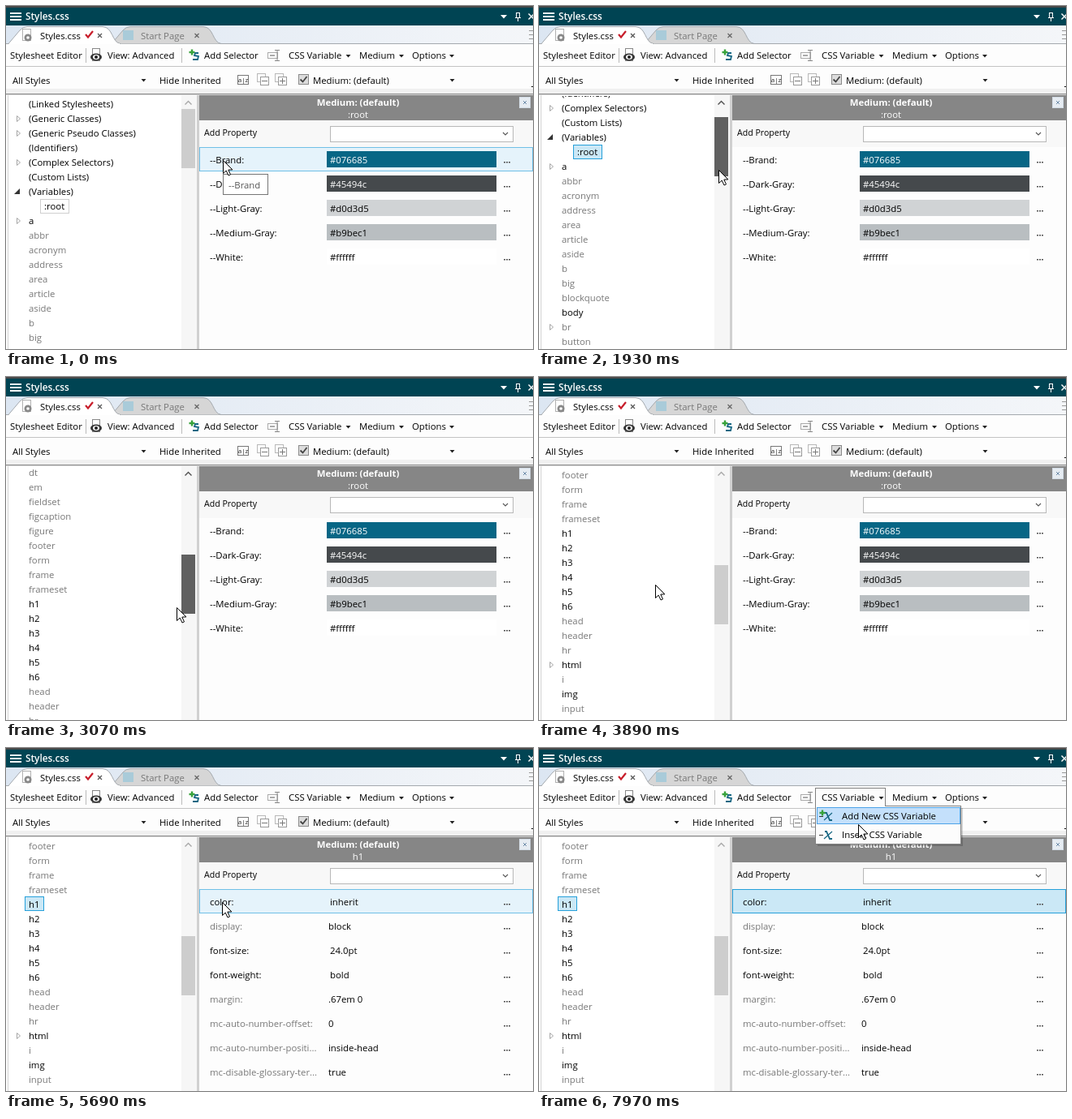
Recreate the animation shown at these times as an HTML page with a canvas. Size 649 by 423 pixels, loop 8000 ms.

```html
<!DOCTYPE html>
<html lang="en">
<head>
<meta charset="utf-8">
<title>Stylesheet editor</title>
<style>
html, body { margin: 0; width: 100%; height: 100%; overflow: hidden; background: #fff; }
canvas { display: block; width: 649px; height: 423px; }
</style>
</head>
<body>
<canvas id="stage" width="649" height="423"></canvas>
<script>
const ctx = document.getElementById('stage').getContext('2d');
const LOOP = 8000;
const ROW = 18, PROP = 30;
const GRAY = '#787878', GREEN = '#37a23b', TEAL = '#176783';

// Moments of interaction
const PRESS = 1620, RELEASE = 3610, PICK = 4580, FOCUS = 5970, OPEN = 7260;

// Pointer moves: each runs from a to b in n jumps and ends at x, y
const home = { x: 267, y: 190 };
const drag = { a: 1930, b: 3340, n: 12, x: 208, y: 297 };
const moves = [
  { a: 500, b: 1060, n: 5, x: 222, y: 192 },
  drag,
  { a: 3610, b: 4420, n: 6, x: 37, y: 190 },
  { a: 5270, b: 5690, n: 4, x: 266, y: 190 },
  { a: 6340, b: 6610, n: 3, x: 393, y: 92 },
  { a: 6760, b: 7130, n: 4, x: 384, y: 57 },
  { a: 7690, b: 7970, n: 3, x: 393, y: 94 }
];
const DRAG_LENGTH = 105, SCROLL_RATIO = 6.68;

// > collapsed, + expanded, * has styles
const tree = ('(Linked Stylesheets)|>(Generic Classes)|>(Generic Pseudo Classes)|(Identifiers)|>(Complex Selectors)|' +
  '(Custom Lists)|+(Variables)|:root|>*a|abbr|acronym|address|area|article|aside|b|big|blockquote|*body|>br|button|' +
  'canvas|caption|center|cite|code|col|colgroup|datalist|dd|del|dir|>*div|dl|dt|em|fieldset|figcaption|figure|footer|' +
  'form|frame|frameset|*h1|*h2|*h3|*h4|*h5|*h6|head|header|hr|>*html|i|*img|input|ins|kbd').split('|');

const variables = [
  ['--Brand:', '#076685'], ['--Dark-Gray:', '#45494c'], ['--Light-Gray:', '#d0d3d5'],
  ['--Medium-Gray:', '#b9bec1'], ['--White:', '#ffffff']
];
const props = [
  ['color:', 'inherit', true], ['display:', 'block'], ['font-size:', '24.0pt', true], ['font-weight:', 'bold', true],
  ['margin:', '.67em 0'], ['mc-auto-number-offset:', '0'], ['mc-auto-number-positi...', 'inside-head'],
  ['mc-disable-glossary-ter...', 'true']
];

function progress(t, { a, b, n }) {
  if (t < a) return 0;
  const jump = Math.floor((t - a + 35) / (b - a) * (n - 1)) + 1;
  return 1 - (1 - Math.min(1, jump / n)) ** 1.185;
}
function pointer(t) {
  let { x, y } = home;
  for (const m of moves) {
    const p = progress(t, m);
    x += (m.x - x) * p;
    y += (m.y - y) * p;
  }
  return { x: Math.round(x), y: Math.round(y) };
}

function fill(c, x, y, w, h) {
  ctx.fillStyle = c;
  ctx.fillRect(x, y, w, h);
}
function frame(c, x, y, w, h) {
  ctx.strokeStyle = c;
  ctx.lineWidth = 1;
  ctx.strokeRect(x + .5, y + .5, w - 1, h - 1);
}
function box(bg, edge, x, y, w, h) {
  fill(bg, x, y, w, h);
  frame(edge, x, y, w, h);
}
function text(s, x, y, c = '#000', { weight = 400, size = 11.35, align = 'left' } = {}) {
  ctx.font = `${weight} ${size}px "Open Sans", "Noto Sans", sans-serif`;
  ctx.textAlign = align;
  ctx.fillStyle = c;
  ctx.fillText(s, x, y + 4);
}
function trace(pts) {
  ctx.beginPath();
  for (let i = 0; i < pts.length; i += 2) ctx.lineTo(pts[i], pts[i + 1]);
}
function poly(c, ...pts) {
  trace(pts);
  ctx.fillStyle = c;
  ctx.fill();
}
function line(c, w, ...pts) {
  trace(pts);
  ctx.strokeStyle = c;
  ctx.lineWidth = w;
  ctx.stroke();
}
function disc(c, x, y, rx, ry = rx) {
  ctx.beginPath();
  ctx.ellipse(x, y, rx, ry, 0, 0, 7);
  ctx.fillStyle = c;
  ctx.fill();
}
function arrow(x, y, c = '#222', r = 3) {
  poly(c, x - r, y - r / 2, x + r, y - r / 2, x, y + r / 2 + .5);
}
function cross(x, y, r, c, w = 1.2) {
  line(c, w, x - r, y - r, x + r, y + r);
  line(c, w, x - r, y + r, x + r, y - r);
}
function plus(x, y) {
  line(GREEN, 2.4, x - 3.5, y, x + 3.5, y);
  line(GREEN, 2.4, x, y - 3.5, x, y + 3.5);
}

function tab(x, r, bg) {
  ctx.beginPath();
  ctx.moveTo(x, 46.5);
  ctx.lineTo(x + 14, 30);
  ctx.quadraticCurveTo(x + 18, 25.5, x + 23, 25.5);
  ctx.lineTo(r - 22, 25.5);
  ctx.bezierCurveTo(r - 9, 26, r - 11, 45, r, 46.5);
  ctx.fillStyle = bg;
  ctx.fill();
  ctx.strokeStyle = '#a4a9ae';
  ctx.lineWidth = 1;
  ctx.stroke();
}

function drawTitle() {
  fill('#4a4a4a', 0, 0, 649, 3);
  fill('#004453', 0, 2, 649, 22);
  for (const y of [8, 12, 16]) fill('#fff', 5, y, 14, 2);
  text('Styles.css', 24, 13, '#fff', { weight: 600, size: 11.8 });
  arrow(613, 13, '#fff', 4);
  frame('#fff', 628, 8, 5, 7);
  fill('#fff', 627, 14, 7, 1);
  fill('#fff', 630, 15, 1, 4);
  cross(647, 13, 3.5, '#fff', 1.5);
}

function drawTabs() {
  const bg = ctx.createLinearGradient(0, 0, 649, 0);
  bg.addColorStop(0, '#dce6f2');
  bg.addColorStop(1, '#f4f6f9');
  fill(bg, 0, 24, 649, 23);
  fill('#a4a9ae', 0, 46, 649, 1);
  tab(130, 265, '#d6d6d6');
  tab(3, 141, '#fff');
  fill('#fff', 4, 46, 136, 1);

  box('#fff', '#b0b0b0', 20, 28, 11, 15);
  disc('#888', 27, 39, 4.5);
  disc('#fff', 27, 39, 1.8);
  text('Styles.css', 42, 37);
  line('#c81e2b', 2.2, 98, 35, 101, 38.5, 107, 31);
  cross(115.5, 36.5, 2.5, '#555');
  fill('#a9cbd9', 144, 30, 13, 12);
  text('Start Page', 166, 37, '#777');
  cross(235, 36.5, 2.5, '#666');
  for (const y of [30, 35, 40]) fill('#999', 644, y, 5, 1);
}

function drawCommands(hover, open) {
  fill('#bbb', 98, 52, 1, 18);
  fill('#bbb', 216, 52, 1, 18);
  box('#fff', '#888', 106, 52, 10, 16);
  disc('#333', 111, 63, 7, 4.5);
  disc('#fff', 111, 63, 4, 3);
  disc('#222', 111, 63, 2);
  plus(229, 57);
  line(TEAL, 1.8, 237, 58, 233, 58, 232, 61, 237, 62, 236, 66, 230, 66);
  frame('#aaa', 322, 57, 13, 8);
  fill('#aaa', 325, 60, 6, 2);
  line('#888', 1, 331, 54.5, 337, 54.5, 334, 54.5, 334, 67.5, 331, 67.5, 337, 67.5);

  if (open) box('#fcfcfc', '#808080', 340, 49, 87, 23);
  else if (hover) box('#cfe6f9', '#70b5e8', 340, 49, 87, 23);

  text('Stylesheet Editor', 5, 61);
  text('View: Advanced', 125, 61);
  text('Add Selector', 244, 61);
  text('CSS Variable', 348, 61);
  text('Medium', 435, 61);
  text('Options', 500, 61);
  for (const x of [421.5, 487, 549]) arrow(x, 61.5);
}

function drawFilters(hover) {
  text('All Styles', 8, 92);
  arrow(169.5, 91.5);
  text('Hide Inherited', 189, 92);
  frame('#777', 285, 85, 14, 12);
  text('a|z', 292, 90, '#222', { size: 8, align: 'center' });
  for (const x of [309, 331]) {
    box('#fff', '#b8b8b8', x, 83, 11, 11);
    box('#fff', '#999', x + 4, 87, 11, 11);
    line('#777', 1, x + 6, 92.5, x + 13, 92.5);
  }
  line('#777', 1, 340.5, 89, 340.5, 96);
  box('#dcdcdc', '#8a8a8a', 360, 84, 13, 13);
  line('#444', 1.8, 362.5, 90.5, 365.5, 93.5, 370.5, 87);
  text('Medium: (default)', 378, 92);
  if (hover) box('#c5e2f8', '#8fc3ea', 543, 81, 13, 20);
  arrow(549.5, 91.5);
}

function drawToolbars({ x, y }, t) {
  const open = t >= OPEN;
  fill('#fdfdfd', 0, 47, 649, 61);
  fill('#c4c4c4', 0, 74, 649, 1);
  fill('#f0f0f0', 0, 102, 649, 6);
  fill('#8c8c8c', 0, 108, 649, 1);
  fill('#d9d9d9', 0, 109, 649, 1);
  fill('#000', 647, 99, 2, 1);
  drawCommands(x >= 340 && x < 427 && y >= 49 && y < 72, open);
  drawFilters(!open && x >= 356 && x < 557 && y > 80 && y < 102);
}

function drawItem(item, y, t) {
  const [, sign, styled, name] = item.match(/^([>+]?)(\*?)(.*)$/);
  const nested = name === ':root';
  if (sign === '>') line('#a6a6a6', 1, 13.5, y - 3.5, 17.5, y, 13.5, y + 3.5, 13.5, y - 3.5);
  if (sign === '+') poly('#333', 17, y - 4, 17, y + 3, 10, y + 3);
  if (nested) {
    const lit = t >= PRESS;
    box(lit ? '#cbe8f6' : '#fff', lit ? '#26a0da' : '#cfcfcf', 42, y - 9, 36, 18);
  }
  if (name === 'h1' && t >= PICK) box('#cbe8f6', '#26a0da', 23, y - 10, 24, 18);
  text(name, nested ? 47 : 28, y, styled || /^[(:]/.test(name) ? '#000' : GRAY);
}

function drawTree({ x }, t) {
  const offset = Math.round(DRAG_LENGTH * progress(t, drag));
  const held = t >= PRESS && t < RELEASE;
  const hover = x >= 216 && x < 234;

  fill('#fff', 0, 110, 216, 313);
  fill('#d4d4d4', 2, 110, 1, 313);
  ctx.save();
  ctx.beginPath();
  ctx.rect(4, 111, 212, 312);
  ctx.clip();
  tree.forEach((item, i) => {
    const y = Math.round(120.5 + i * ROW - offset * SCROLL_RATIO);
    if (y > 95 && y < 440) drawItem(item, y, t);
  });
  ctx.restore();

  fill('#f6f6f6', 216, 110, 19, 313);
  fill('#d0d0d0', 235, 110, 3, 313);
  line(held || hover ? '#505050' : '#a8a8a8', 1.4, 220.5, 121.5, 224.5, 117.5, 228.5, 121.5);
  fill(held ? '#606060' : hover ? '#a6a6a6' : '#cdcdcd', 216, 127 + offset, 17, 73);
}

function drawProperty(i, name, value, { ink = '#000', valueInk = '#000', valueX = 399 }) {
  const y = 190 + i * PROP;
  text(name, 251, y, ink);
  text(value, valueX, y, valueInk);
  for (const x of [613, 616, 619]) fill('#555', x, y + 2, 2, 1.5);
}

function drawPanel({ x, y }, t) {
  const picked = t >= PICK;
  fill('#fdfdfd', 238, 110, 411, 313);
  fill('#868686', 238, 110, 411, 31);
  text('Medium: (default)', 433.5, 119, '#fff', { weight: 700, align: 'center' });
  text(picked ? 'h1' : ':root', 433.5, 134, '#fff', { align: 'center' });
  box('#e6ecf2', '#d2dbe4', 632, 112, 14, 14);
  cross(639, 119, 2, '#6f8dab', 1);

  fill('#f8f8f8', 238, 141, 411, 33);
  text('Add Property', 244, 156, '#000', { size: 10.6 });
  box('#fff', '#b8b8b8', 399, 148, 226, 20);
  line('#555', 1.1, 612, 156, 615, 159, 618, 156);

  if (t >= FOCUS) box('#cbe8f6', '#26a0da', 238, 174, 411, 30);
  else if (x >= 238 && y > 174 && y < 204) box('#e5f3fb', '#70c0e7', 238, 174, 411, 30);

  if (picked) {
    props.forEach(([name, value, set], i) =>
      drawProperty(i, name, value, { ink: set ? '#000' : GRAY, valueX: set ? 399 : 397 }));
  } else {
    variables.forEach(([name, color], i) => {
      fill(color, 395, 179 + i * PROP, 209, 20);
      drawProperty(i, name, color, { valueInk: i < 2 ? '#fff' : '#000' });
    });
  }
  if (t < moves[0].a) {
    box('#fff', '#767676', 267, 207, 56, 26);
    text('--Brand', 274, 221, '#575757');
  }
}

function drawMenu({ y }) {
  fill('rgba(0,0,0,.18)', 343, 74, 179, 47);
  box('#fcfcfc', '#808080', 340, 71, 180, 48);
  fill('#fcfcfc', 341, 71, 85, 1);
  if (y > 73) box('#c4e0fb', '#4da3e8', 342, 73, 177, 21);
  ['Add New CSS Variable', 'Insert CSS Variable'].forEach((label, i) => {
    const cy = 84 + i * 23;
    line('#333', 1, 345, cy + .5, 350, cy + .5);
    line(TEAL, 1.8, 352, cy - 4, 354, cy - 4, 358, cy + 5, 361, cy + 5);
    line(TEAL, 1.2, 361, cy - 4, 351, cy + 5);
    if (!i) plus(349, cy - 4);
    text(label, 373, cy);
  });
}

function drawCursor({ x, y }) {
  ctx.save();
  ctx.translate(x + .5, y + .5);
  trace([0, 0, 0, 16, 3.7, 12.6, 6.5, 18.5, 9, 17.4, 6.3, 11.6, 11.4, 11.4]);
  ctx.closePath();
  ctx.fillStyle = '#fff';
  ctx.fill();
  ctx.strokeStyle = '#000';
  ctx.lineWidth = 1;
  ctx.stroke();
  ctx.restore();
}

function render(t) {
  const mouse = pointer(t);
  drawTitle();
  drawTabs();
  drawToolbars(mouse, t);
  drawTree(mouse, t);
  drawPanel(mouse, t);
  if (t >= OPEN) drawMenu(mouse);
  drawCursor(mouse);
}

const start = performance.now();
function tick() {
  render((performance.now() - start) % LOOP);
  requestAnimationFrame(tick);
}
tick();
</script>
</body>
</html>
```
